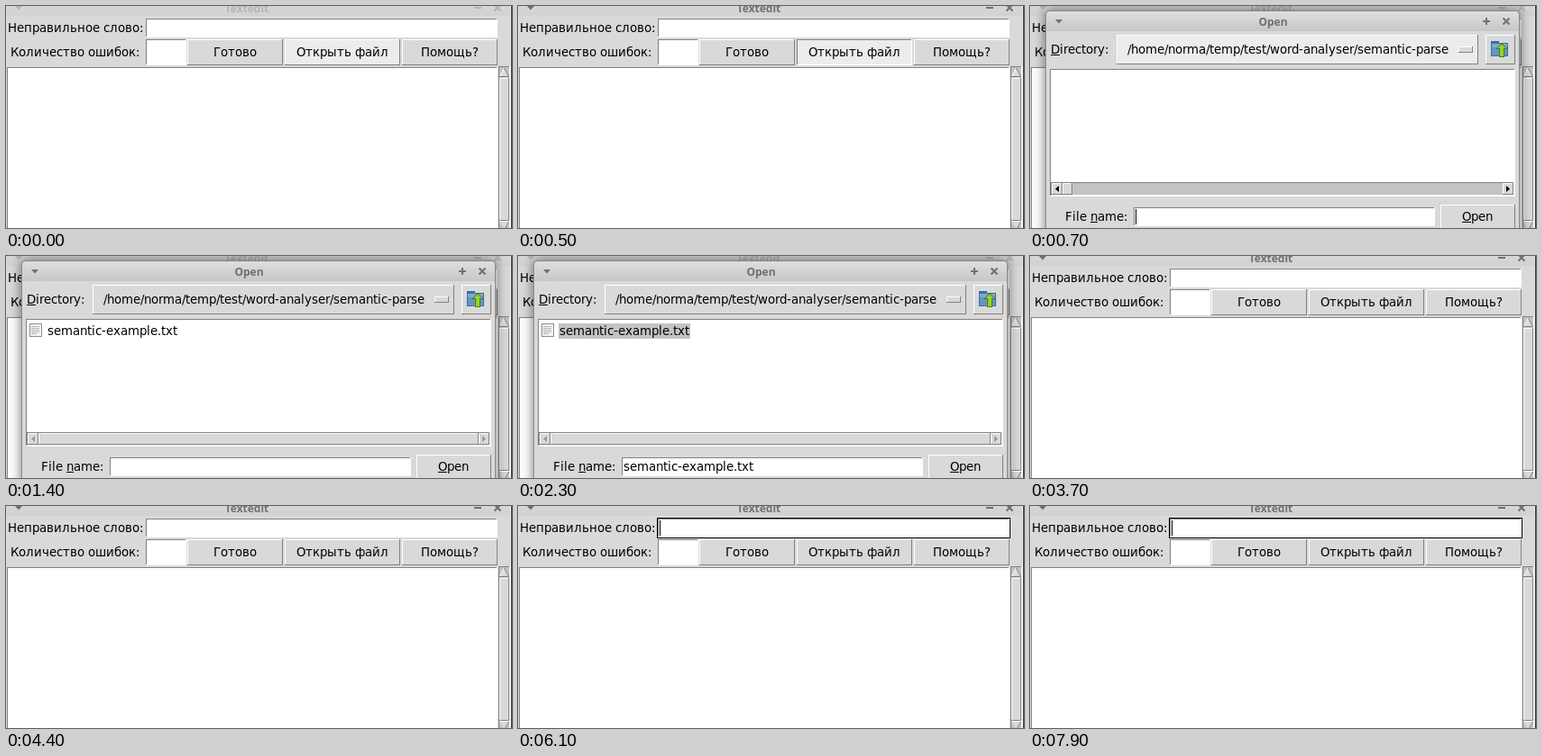
Recreate the animation shown at these times as an HTML page with a canvas. Size 561 by 247 pixels, loop 8 s.

```html
<!DOCTYPE html>
<html lang="ru">
<head>
<meta charset="utf-8">
<title>Textedit</title>
<style>
  html, body { margin: 0; width: 100%; height: 100%; overflow: hidden; background: #d9d9d9; }
  canvas { display: block; }
</style>
</head>
<body>
<canvas id="stage" width="561" height="247"></canvas>
<script>
const ctx = document.getElementById('stage').getContext('2d');
const LOOP = 8000;
const FACE = '#d9d9d9', HOVER = '#ececec', DARK = '#828282', TROUGH = '#c3c3c3';
const UI_FONT = '13.333px "DejaVu Sans", sans-serif';
const TITLE_FONT = 'bold 12px "Open Sans", sans-serif';

function box(x, y, w, h, color) {
  ctx.fillStyle = color;
  ctx.fillRect(x, y, w, h);
}

function poly(color, ...points) {
  ctx.fillStyle = color;
  ctx.beginPath();
  for (let i = 0; i < points.length; i += 2) ctx.lineTo(points[i], points[i + 1]);
  ctx.fill();
}

function bevel(x, y, w, h, fill, sunken = false) {
  const [light, shade] = sunken ? [DARK, '#fff'] : ['#fff', DARK];
  box(x, y, w, h, shade);
  box(x, y, w - 1, h - 1, light);
  box(x + 1, y + 1, w - 2, h - 2, fill);
}

const advance = ch => Math.round(ctx.measureText(ch).width);

// Glyphs sit on whole pixels, as in hinted toolkit text.
function text(str, x, y, underlined = -1) {
  ctx.font = UI_FONT;
  ctx.fillStyle = '#000';
  [...str].forEach((ch, i) => {
    ctx.fillText(ch, x, y);
    if (i === underlined) ctx.fillRect(x, y + 1, advance(ch), 1);
    x += advance(ch);
  });
}

function textWidth(str) {
  ctx.font = UI_FONT;
  return [...str].reduce((sum, ch) => sum + advance(ch), 0);
}

function button(label, x, w, hover, pressed) {
  bevel(x, 37, w, 29, hover ? HOVER : FACE, pressed);
  text(label, x + Math.round((w - textWidth(label)) / 2), 56);
}

function titleBar(label, cy, menuX, signX, closeX, color, minimise) {
  ctx.font = TITLE_FONT;
  ctx.fillStyle = color;
  ctx.textAlign = 'center';
  ctx.fillText(label, minimise ? 267 : 269.5, cy + 5);
  ctx.textAlign = 'left';
  poly(color, menuX - 4, cy - 2, menuX + 4, cy - 2, menuX, cy + 2.5);
  box(signX - 4, cy - 1, 8, 2, color);
  if (!minimise) box(signX - 1, cy - 4, 2, 8, color);
  ctx.strokeStyle = color;
  ctx.lineWidth = 2;
  ctx.beginPath();
  for (const s of [-1, 1]) {
    ctx.moveTo(closeX - 3.5, cy - 3.5 * s);
    ctx.lineTo(closeX + 3.5, cy + 3.5 * s);
  }
  ctx.stroke();
}

function gradient(y0, y1, top, bottom) {
  const g = ctx.createLinearGradient(0, y0, 0, y1);
  g.addColorStop(0, top);
  g.addColorStop(1, bottom);
  return g;
}

// A caret is lit for 600 ms and dark for 300 ms.
const caretOn = elapsed => elapsed >= 0 && elapsed % 900 < 600;

function drawEditor(t, dialogOpen) {
  const active = t >= 500 && !dialogOpen;
  const opening = t < 700;
  const focused = t >= 6100;
  box(0, 0, 561, 247, FACE);
  box(0, 0, 561, 11, gradient(0, 11, '#d6d6d6', '#d2d2d2'));
  titleBar('Textedit', 2, 14, 523, 545, active ? '#707070' : '#b4b4b4', true);

  text('Неправильное слово:', 2, 29);
  if (focused) box(154, 13, 392, 23, '#000');
  bevel(155, 14, 390, 21, '#fff', true);
  if (caretOn(t - 6100)) box(157, 16, 1, 17, '#000');

  text('Количество ошибок:', 5, 56);
  bevel(155, 37, 45, 29, '#fff', true);
  button('Готово', 201, 106, t >= 4300 && t < 4400, false);
  button('Открыть файл', 309, 128, opening, opening && t >= 500);
  button('Помощь?', 439, 106, false, false);

  bevel(1, 68, 544, 190, '#fff', true);
  bevel(546, 67, 13, 190, TROUGH, true);
  poly(FACE, 552.5, 69, 558, 79, 547, 79);
  poly(FACE, 547, 239, 558, 239, 552.5, 249);
  ctx.lineWidth = 1;
  ctx.strokeStyle = '#fff';
  ctx.beginPath();
  ctx.moveTo(552.5, 69); ctx.lineTo(547.5, 79);
  ctx.moveTo(547, 239.5); ctx.lineTo(558, 239.5);
  ctx.stroke();
  ctx.strokeStyle = DARK;
  ctx.beginPath();
  ctx.moveTo(552.5, 69); ctx.lineTo(557.5, 78.5); ctx.lineTo(547, 78.5);
  ctx.moveTo(557.5, 240); ctx.lineTo(552.5, 249);
  ctx.stroke();
  bevel(547, 80, 11, 159, FACE);
  box(559, 0, 1, 247, '#e4e4e4');
  box(560, 0, 1, 247, '#33333d');
}

function drawFolderUp() {
  bevel(505, 32, 33, 33, FACE);
  box(511, 39, 9, 4, '#3a6ea5');
  box(511, 41, 19, 15, '#3a6ea5');
  box(512, 42, 17, 13, '#7fa9d6');
  box(512, 46, 17, 9, '#6395c9');
  const arrow = [523, 41, 530, 48, 526, 48, 526, 57, 520, 57, 520, 48, 516, 48];
  poly('#4e7a10', ...arrow);
  poly('#94d32c', 523, 42.5, 528, 47, 525, 47, 525, 56, 521, 56, 521, 47, 518, 47);
}

function drawFileIcon() {
  box(26, 75, 14, 15, '#8c8c8c');
  box(27, 76, 12, 13, '#f4f4f4');
  for (let y = 78; y < 88; y += 2) box(28, y, y > 85 ? 6 : 9, 1, '#b5b5b5');
}

function drawListScrollbar(empty) {
  bevel(23, 196, 514, 15, TROUGH, true);
  bevel(24, 197, 12, 13, FACE);
  bevel(524, 197, 12, 13, FACE);
  bevel(36, 197, empty ? 11 : 488, 13, FACE);
  const color = empty ? '#000' : '#999';
  poly(color, 32, 200, 32, 207, 28, 203.5);
  poly(color, 528, 200, 528, 207, 532, 203.5);
}

function drawDialog(t) {
  const listed = t >= 800;
  const chosen = t >= 2300;
  const pressed = t >= 3600;
  const file = 'semantic-example.txt';

  ctx.save();
  ctx.shadowColor = 'rgba(0,0,0,.55)';
  ctx.shadowBlur = 13;
  ctx.fillStyle = '#8a8a8a';
  ctx.beginPath();
  ctx.roundRect(17, 5, 526, 270, 5);
  ctx.fill();
  ctx.restore();
  ctx.fillStyle = gradient(6, 29, '#dedede', '#c6c6c6');
  ctx.beginPath();
  ctx.roundRect(18, 6, 524, 260, 4);
  ctx.fill();
  box(18, 28, 524, 219, FACE);
  titleBar('Open', 17, 32, 506, 528, '#707070', false);

  text('Directory:', 23, 53, 0);
  bevel(96, 32, 401, 33, t < 1400 ? HOVER : FACE);
  text('/home/norma/temp/test/word-analyser/semantic-parse', 108, 53);
  bevel(475, 45, 16, 7, FACE);
  drawFolderUp();

  bevel(22, 70, 516, 142, '#fff', true);
  if (listed) {
    drawFileIcon();
    if (chosen && !pressed) box(45, 75, textWidth(file) + 2, 17, TROUGH);
    text(file, 46, 88);
  }
  drawListScrollbar(!listed);

  text('File name:', 39, 239, 5);
  bevel(115, 224, 334, 21, '#fff', true);
  if (chosen) text(file, 117, 239);
  else if (!listed || caretOn(t - 800)) box(117, 226, 1, 17, '#000');

  bevel(455, 221, 83, 33, t >= 2800 ? HOVER : FACE, pressed);
  if (pressed) {
    for (let x = 456; x < 537; x += 2) box(x, 222, 1, 1, '#000');
    for (let y = 222; y < 247; y += 2) {
      box(456, y, 1, 1, '#000');
      box(536, y, 1, 1, '#000');
    }
  }
  const shift = pressed ? 1 : 0;
  text('Open', 479 + shift, 239 + shift, 0);
}

function frame() {
  const t = performance.now() % LOOP;
  const dialogOpen = t >= 700 && t < 3700;
  drawEditor(t, dialogOpen);
  if (dialogOpen) drawDialog(t);
  requestAnimationFrame(frame);
}
frame();
</script>
</body>
</html>
```
